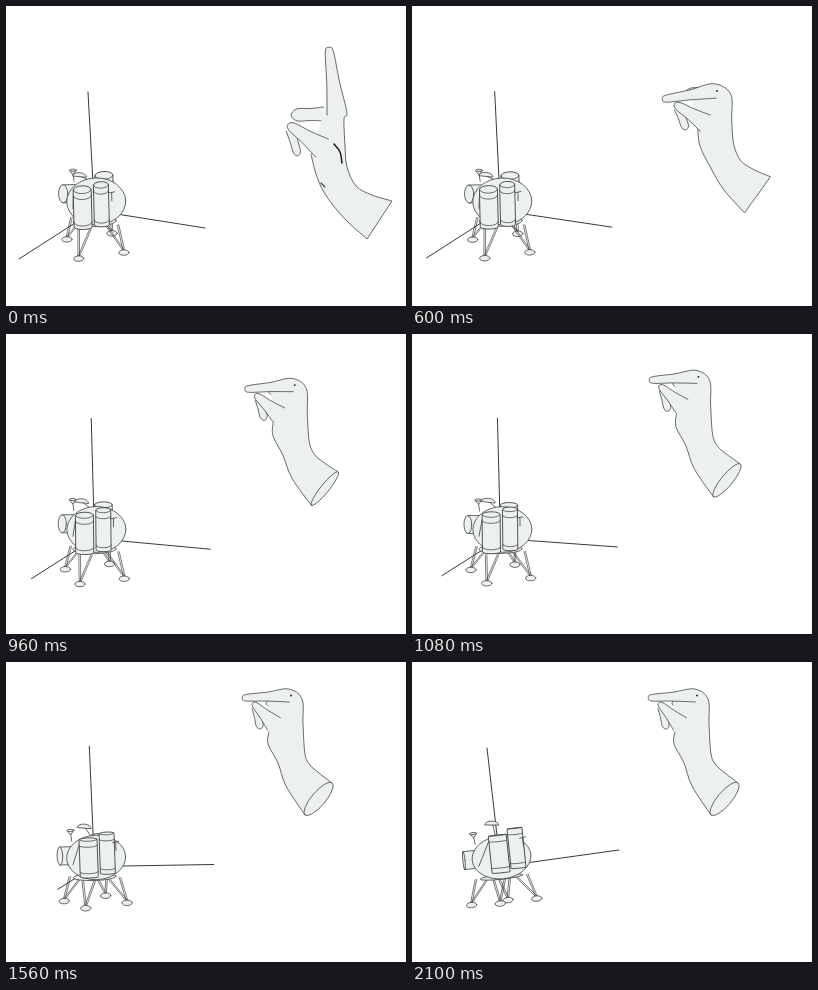
Write an HTML page with a canvas that moves like this. It is 400 px wide and 300 px high and loops after 2130 ms.

```html
<!DOCTYPE html>
<html lang="en">
<head>
<meta charset="utf-8">
<title>Hand and lander</title>
<style>
html, body { margin: 0; width: 100%; height: 100%; overflow: hidden; background: #fff; }
canvas { display: block; width: 400px; height: 300px; }
</style>
</head>
<body>
<canvas id="stage" width="400" height="300"></canvas>
<script>
const ctx = document.getElementById('stage').getContext('2d');
const LOOP = 2130, STEP = 30, TAU = Math.PI * 2, DEG = Math.PI / 180;
const FILL = '#ecf1ef', INK = '#383a3a';

const mix = (a, b, u) => a + (b - a) * u;
const span = (t, from, to) => Math.max(0, Math.min(1, (t - from) / (to - from)));
const easeOut = (u, power) => 1 - (1 - u) ** power;

function paint(fill, width = 0.75, ink = INK) {
  if (fill) { ctx.fillStyle = fill; ctx.fill(); }
  ctx.lineWidth = width;
  ctx.strokeStyle = ink;
  ctx.stroke();
}

function line(x1, y1, x2, y2, width = 0.75) {
  ctx.beginPath();
  ctx.moveTo(x1, y1);
  ctx.lineTo(x2, y2);
  paint(null, width);
}

function oval(x, y, rx, ry, rot = 0, from = 0, to = TAU) {
  ctx.beginPath();
  ctx.ellipse(x, y, rx, ry, rot, from, to);
  paint(FILL);
}

// Adds a smooth curve through the points to the current path.
function trace(pts) {
  const at = i => pts[Math.max(0, Math.min(pts.length - 1, i))];
  ctx.lineTo(...pts[0]);
  for (let i = 0; i < pts.length - 1; i++) {
    const [a, b, c, d] = [at(i - 1), at(i), at(i + 1), at(i + 2)];
    ctx.bezierCurveTo(b[0] + (c[0] - a[0]) / 6, b[1] + (c[1] - a[1]) / 6,
      c[0] - (d[0] - b[0]) / 6, c[1] - (d[1] - b[1]) / 6, ...c);
  }
}

// ---- hand ----
// Fingers: base x, base y, length, angle, base radius, tip radius;
// one row each for pointing, pinched and lifted.
const index = [[331,108,63,-97,10,4], [320,110,55,-192,8,3.6], [283,33.5,43.5,-183,6.5,3.2]];
const thumb = [[316,142,37,-145,11,4.5], [315,144,37,-154,10,4.5], [268,62,27,-135,9,3]];
const middle = [[318,108,27,-182,7,6], [318,110,28,-180,9,6], [280,40,16,-184,5,4]];
const ring = [[285,124,23,75,5,3.6], [281,130,20,67,5,3.6], [250,46,18,78,4,3.5]];
// The two sides of the arm, low and high.
const armTop = [[338,113, 339,140, 341,161, 350,180, 366,189, 386,195],
  [296,37, 297,62, 299,92, 304,103, 313,111, 326,121]];
const armBottom = [[361,233, 338,212, 319,188, 310,168, 305,148],
  [299,153, 280,124, 272,101, 262,82, 263,70]];

const pairs = list => list.flatMap((v, i) => i % 2 ? [] : [[v, list[i + 1]]]);

function limb([x, y, len, deg, r0, r1]) {
  const dx = Math.cos(deg * DEG), dy = Math.sin(deg * DEG);
  const rows = [[0, r0], [len / 2, (r0 + r1) * 0.46], [len, r1]];
  const side = s => rows.map(([d, r]) => [x + dx * d + dy * r * s, y + dy * d - dx * r * s]);
  const tip = [x + dx * (len + r1), y + dy * (len + r1)];
  return [...side(1), tip, ...side(-1).reverse()];
}

function drawLimb(row) {
  ctx.beginPath();
  trace(limb(row));
  paint(FILL);
}

function drawHand(t) {
  const curl = (1 - Math.cos(Math.PI * span(t, 0, 360))) / 2;
  const u = span(t, 390, 1320);
  const ease = [easeOut(u, 2.4), easeOut(u, 1.55)];
  const lift = (a, b) => a.map((v, i) => mix(v, b[i], ease[i % 2]));
  const finger = ([a, b, c]) => lift(a.map((v, i) => mix(v, b[i], curl)), c);

  const point = finger(index), th = finger(thumb);
  const top = pairs(lift(...armTop)), bottom = pairs(lift(...armBottom));

  drawLimb(finger(ring));
  drawLimb(finger(middle));

  // Fill behind the web of the hand, then the outline from finger to wrist.
  const [ix, iy, len, deg] = point;
  ctx.beginPath();
  ctx.moveTo(...bottom[4]);
  ctx.lineTo(ix + len / 2 * Math.cos(deg * DEG), iy + len / 2 * Math.sin(deg * DEG));
  ctx.lineTo(...top[0]);
  ctx.lineTo(...top[1]);
  ctx.fillStyle = FILL;
  ctx.fill();
  ctx.beginPath();
  trace([...limb(point), ...top]);
  trace(bottom);
  paint(FILL);
  drawLimb(th);

  const [x1, y1] = top[5], [x2, y2] = bottom[0], open = 7 * span(u, 0.25, 0.85);
  if (open) {
    oval((x1 + x2) / 2, (y1 + y2) / 2, Math.hypot(x2 - x1, y2 - y1) / 2, open,
      Math.atan2(y2 - y1, x2 - x1));
  }
  if (u < 0.2) {
    const [bx, by] = th;
    ctx.beginPath();
    trace([[bx + 12, by - 4], [bx + 18, by + 4], [bx + 20, by + 15]]);
    paint(null, 1.4, '#111');
    line(bottom[3][0] + 5, bottom[3][1] + 9, bottom[3][0] + 9, bottom[3][1] + 13, 1.1);
  }
  if (curl > 0.7) {
    ctx.beginPath();
    ctx.arc(ix + 2, iy, 0.9, 0, TAU);
    ctx.fillStyle = '#111';
    ctx.fill();
  }
}

// ---- lander ----
// Axis tips at the start, middle and end of the turn.
const axes = [
  [[82,86], [85,84], [75,86]],
  [[199,222], [207,208], [207,188]],
  [[13,253], [40,235], [84,206]]
];
const CX = 88.5, CY = 204.5;

// Quadratic that passes a, m, b at u = 0, 0.5, 1.
const arc = (a, m, b, u) => {
  const bend = 2 * (a + b - 2 * m);
  return a + (b - a - bend) * u + bend * u * u;
};

function drawLander(t) {
  const u = span(t, 540, 2100);
  const yaw = arc(31, 22, 7, u), tilt = arc(0.43, 0.25, 0.04, u), roll = arc(-1.5, -1, -6, u);

  // Place on a level ring: radius, bearing, height on the stage.
  const ring = (r, deg, y) => {
    const a = (deg + yaw) * DEG;
    return [CX + r * Math.cos(a), y + r * Math.sin(a) * tilt];
  };

  const leg = deg => {
    const [x, y] = ring(33, deg, 240), [bx, by] = ring(20, deg, 215);
    for (const s of [-6, 6]) {
      for (const o of [-0.8, 0.8]) line(bx + s + o, by, x + o, y - 2, 0.65);
    }
    oval(x, y, 5.2, 2.7);
  };

  const tank = (r, deg, w, y0, y1) => {
    const [x, top] = ring(r, deg, y0), base = top + y1 - y0, rim = w * tilt;
    ctx.beginPath();
    ctx.ellipse(x, top, w, rim, 0, Math.PI, TAU);
    ctx.ellipse(x, base, w, rim * 0.6, 0, 0, Math.PI);
    ctx.closePath();
    paint(FILL, 0.85);
    for (const y of [top, top + 6, base - 5]) {
      ctx.beginPath();
      ctx.ellipse(x, y, w, rim, 0, 0, Math.PI);
      paint(null, 0.7);
    }
  };

  for (const [a, m, b] of axes) {
    line(CX, CY, arc(a[0], m[0], b[0], u), arc(a[1], m[1], b[1], u), 1);
  }

  ctx.save();
  ctx.translate(CX, CY);
  ctx.rotate(roll * DEG);
  ctx.translate(-CX, -CY);

  [270, 180, 0, 90].forEach(leg);
  oval(CX, 215, 21.5, 2 + 8 * tilt);

  // cup, dome and far tank
  const [cx, cy] = ring(24, 180, 169), [dx, dy] = ring(25, 93, 161);
  line(cx, cy + 3, cx + 1, cy + 11);
  ctx.beginPath();
  ctx.moveTo(cx - 3.5, cy);
  ctx.lineTo(cx, cy + 4.5);
  ctx.lineTo(cx + 3.5, cy);
  paint(FILL);
  oval(cx, cy, 3.5, 1.1);
  line(dx + 1, dy, 87, 176);
  ctx.beginPath();
  ctx.ellipse(dx, dy, 7, 3.6, 0.12, Math.PI, TAU);
  ctx.closePath();
  paint(FILL);
  tank(20, 270, 9, 177, 200);

  // nozzle and hull
  const [nx, ny] = ring(36, 180, 195);
  ctx.beginPath();
  ctx.rect(nx, ny - 9, 12, 18);
  paint(FILL);
  oval(nx, ny, 9 * Math.sin(yaw * DEG), 9);
  oval(90.5, 195.5, 29.5, mix(23.5, 21.5, u));

  const [ax, ay] = ring(29, 83, 172);
  line(67, 202, ax - 9, ay + 5);
  tank(29, 45, 7.5, 167, 207);
  tank(29, 83, 9, 172, 209.5);

  const [mx, my] = ring(28, 20, 178);
  line(mx - 3, my, mx + 3, my - 1);
  line(mx, my, mx, my + 8);
  ctx.restore();
}

function draw(t) {
  ctx.fillStyle = '#fff';
  ctx.fillRect(0, 0, 400, 300);
  drawLander(t);
  drawHand(t);
}

ctx.lineJoin = ctx.lineCap = 'round';
const start = performance.now();
function tick() {
  const t = (performance.now() - start) % LOOP;
  draw(Math.floor(t / STEP) * STEP);
  requestAnimationFrame(tick);
}
tick();
</script>
</body>
</html>
```
